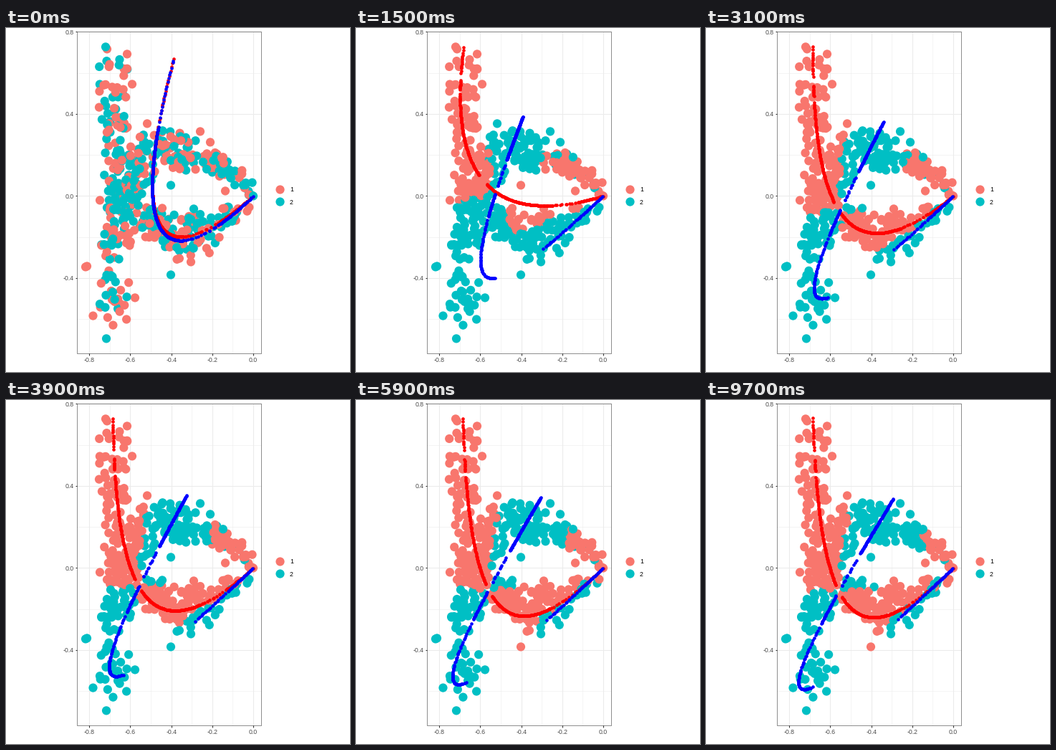
A matplotlib script that plays this animation: 480 px wide and 480 px high, repeating every 10000 ms.

```python
import numpy as np
import matplotlib.pyplot as plt
from matplotlib.animation import FuncAnimation
from matplotlib.patches import Rectangle

plt.rcParams["font.family"] = "Liberation Sans"
SALMON, TEAL = "#F8766D", "#00BFC4"
ORIGIN = (345, 235)
rng = np.random.default_rng(12)


def band(p, q, width, n):
    """Points strewn around the segment from p to q."""
    u = rng.random((n, 1))
    ang = rng.uniform(0, 2 * np.pi, n)
    r = width * np.sqrt(rng.random(n))
    off = np.column_stack([r * np.cos(ang), r * np.sin(ang)])
    return np.array(p) * (1 - u) + np.array(q) * u + off


def shuffled(*parts):
    return rng.permutation(np.vstack(parts).astype(float))


# A tall arm bending down to the origin, and its mirrored twin;
# each starts with a few lone points
first = shuffled([(139, 27), (141, 30), (169, 37), (176, 79), (197, 134),
                  (131, 241), (230, 345), (258, 327), (262, 253)],
                 band((149, 50), (150, 130), 24, 34),
                 band((152, 130), (158, 185), 22, 26),
                 band((160, 190), (165, 250), 25, 78),
                 band((198, 262), (222, 290), 20, 40),
                 band((222, 294), (268, 288), 32, 62),
                 band((275, 284), (335, 245), 13, 32))
second = shuffled([(111, 334), (113, 333), (180, 377), (140, 434), (230, 220),
                   (271, 145), (285, 160), (218, 252), (306, 228)],
                  band((203, 152), (186, 240), 17, 48),
                  band((212, 166), (265, 178), 27, 62),
                  band((280, 184), (330, 210), 16, 40),
                  band((333, 216), ORIGIN, 5, 9),
                  band((165, 262), (150, 310), 24, 52),
                  band((150, 335), (146, 408), 25, 30))
pts = np.vstack([first, second, [ORIGIN]])
luck = rng.random(len(pts))

# Bezier handles: random start, after the first rough fit, and settled
RED = np.array([[(205, 357), (172, 278), (234, 43)],
                [(222, 271), (122, 245), (150, 28)],
                [(202, 376), (158, 298), (149, 26)]])
BLUE = np.array([[(205, 369), (172, 278), (234, 43)],
                 [(186, 380), (114, 431), (233, 124)],
                 [(143, 424), (20, 532), (262, 138)]])


def settle(step, pace):
    return 1 - np.exp(-(step - 4) / pace)


def curve(poses, pace, step, t):
    start, rough, final = poses
    if step < 4:
        h = rough + (start - rough) * (1 - step / 4) ** 1.7
    else:
        h = rough + (final - rough) * settle(step, pace)
    p = np.vstack([ORIGIN, h])
    t = np.asarray(t)[:, None]
    s = 1 - t
    return s**3 * p[0] + 3 * s * s * t * p[1] + 3 * s * t * t * p[2] + t**3 * p[3]


def red_curve(step, t):
    return curve(RED, 3.3, step, t)


def blue_curve(step, t):
    return curve(BLUE, 5.5, step, t)


def strew(*ranges):
    """Jittered positions along a curve, k of them from a to b."""
    t = [a + (b - a) * (np.arange(k) + rng.random(k)) / k for a, b, k in ranges]
    return rng.permutation(np.concatenate(t))


RED_T = strew((0, .1, 26), (.1, .2, 9), (.2, .54, 110), (.595, .89, 92),
              (.9, .927, 10), (.942, 1, 14))
RIGHT_T = strew((0, .4, 26), (.4, 1, 20))
LEFT_T = strew((.44, .58, 20), (.58, .8, 38), (.805, .862, 26),
               (.875, .92, 12), (.928, 1, 95))
START_T = [strew((0, .13, 40), (.13, .3, 14), (.3, .85, 190), (.86, 1, 18))
           for _ in range(2)]


def reach(step):
    return .2 - .065 * settle(max(step, 4), 5.5)


def dots(step, shift=0):
    red_t, blue_t = START_T
    if step:
        red_t = RED_T
        blue_t = np.concatenate([RIGHT_T * reach(step), LEFT_T])
    return [red_curve(step, np.roll(red_t, shift)),
            blue_curve(step, np.roll(blue_t, shift))]


def gap(path):
    return np.hypot(*(pts[:, None] - path[None]).transpose(2, 0, 1)).min(axis=1)


def labels(step):
    """True where a point belongs to the second curve."""
    if step == 0:
        return luck < .5
    blue_t = np.concatenate([np.linspace(.02, reach(step), 25),
                             np.linspace(.44, 1, 80)])
    nearer = (gap(blue_curve(step, blue_t))
              < gap(red_curve(step, np.linspace(0, 1, 120))))
    x, y = pts.T
    edge = 255 + 48 * settle(max(step, 4), 5.5)
    arc = (x > 250) & (y < 238)
    return np.where(arc, (x < edge) | (y < 174) | (luck > .78), nearer)


CLASS = [labels(s) for s in range(28)]


def schedule(i):
    """Step shown at tick i, and whether it is on its way to the next one."""
    if i < 2:
        return 0, False
    if i < 70:
        k, r = divmod(i - 2, 4)
        return (k, True) if r == 0 else (k + 1, False)
    return 18 + (i - 70) // 3, False


def halfway(a, b):
    m = min(len(a), len(b))
    return (a[:m] + b[:m]) / 2


fig = plt.figure(figsize=(480 / 72, 480 / 72), dpi=72, facecolor="white")
ax = fig.add_axes([0, 0, 1, 1])
ax.set_xlim(0, 480)
ax.set_ylim(480.6, .6)
ax.axis("off")

L, R, T, B = 99.3, 356, 5.9, 454.6
GRID, INK, LABEL = "#EBEBEB", "#333333", "#4D4D4D"


def px(v):
    return 345 + 285.9 * v


def py(v):
    return 235 - 286.3 * v


def rule(xs, ys, color, width, z):
    ax.plot(xs, ys, color=color, lw=width, zorder=z, solid_capstyle="butt")


for v in np.arange(-8, 1) / 10:
    major = round(v * 10) % 2 == 0
    rule([px(v)] * 2, [T, B], GRID, 1.07 if major else .53, 1)
    if major:
        rule([px(v)] * 2, [B, B + 2.8], INK, 1.07, 1)
        ax.text(px(v), 467, f"{v:.1f}", size=8.8, color=LABEL, ha="center")
for v in np.arange(-3, 5) / 5:
    major = round(v * 5) % 2 == 0
    rule([L, R], [py(v)] * 2, GRID, 1.07 if major else .53, 1)
    if major:
        rule([L - 2.8, L], [py(v)] * 2, INK, 1.07, 1)
        ax.text(94.5, py(v) + 3.2, f"{v:.1f}", size=8.8, color=LABEL, ha="right")
ax.add_patch(Rectangle((L, T), R - L, B - T, fill=False, ec=INK, lw=.55,
                       zorder=9))

BIG, SMALL = 12.2**2, 4.6**2
for name, y, color in (("1", 225.8, SALMON), ("2", 243, TEAL)):
    ax.scatter([382], [y], s=BIG, c=color, lw=0)
    ax.text(396, y + 3.2, name, size=8.8, color="black")

cloud = ax.scatter([], [], s=BIG, lw=0, zorder=3)
trails = [ax.scatter([], [], s=SMALL, c=c, lw=0, zorder=z)
          for c, z in (("#FF0000", 4), ("#0000FF", 5))]
HUES = np.array([SALMON, TEAL])


def draw(i):
    step, moving = schedule(i)
    if moving:
        # rows are paired by their order within each class
        old, new = CLASS[step], CLASS[step + 1]
        pairs = [halfway(pts[old == c], pts[new == c]) for c in (False, True)]
        pos = np.vstack(pairs)
        kind = np.repeat([0, 1], [len(p) for p in pairs])
        paths = [halfway(a, b) for a, b in zip(dots(step), dots(step + 1, 1))]
    else:
        pos, kind, paths = pts, CLASS[step].astype(int), dots(step)
    cloud.set_offsets(pos)
    cloud.set_facecolor(HUES[kind])
    for trail, path in zip(trails, paths):
        trail.set_offsets(path)
    return [cloud, *trails]


anim = FuncAnimation(fig, draw, frames=100, interval=100, repeat=True,
                     repeat_delay=0, blit=False)
plt.show()
```
